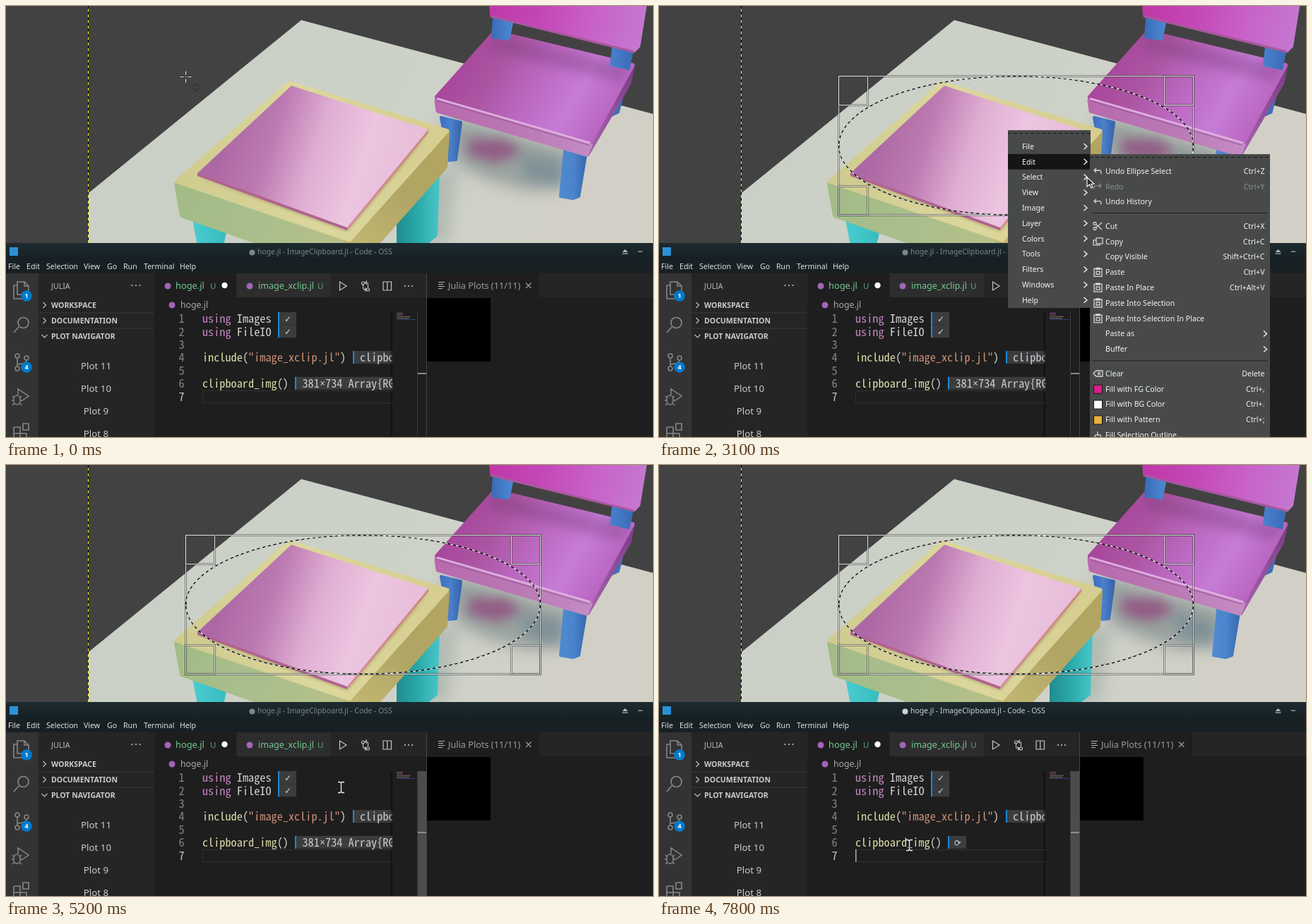
Animation, 916 px wide and 611 px high, one loop 8000 ms. Source, as an HTML page with a canvas:

```html
<!DOCTYPE html>
<html lang="en">
<head>
<meta charset="utf-8">
<title>Copy a selection into the editor</title>
<style>
html, body { margin: 0; width: 100%; height: 100%; overflow: hidden; background: #1e1e1e; }
canvas { display: block; width: 916px; height: 611px; }
</style>
</head>
<body>
<canvas id="stage" width="916" height="611"></canvas>
<script>
const W = 916, H = 611, TOP = 336, LOOP = 8000;
const view = document.getElementById('stage').getContext('2d');
const backdrop = document.createElement('canvas');
backdrop.width = W;
backdrop.height = H;
let ctx = backdrop.getContext('2d');

const SANS = '"Noto Sans", sans-serif';
const MONO = '"Noto Sans Mono CJK JP", "Noto Sans Mono", monospace';
const SYMBOL = '"DejaVu Sans", sans-serif';
const ADVANCE = 8.13;
ctx.font = '100px ' + MONO;
const monoSize = 100 * ADVANCE / ctx.measureText('0').width;
const row = n => 443.3 + (n - 1) * 18.4;

// ---- drawing helpers ----
function box(x, y, w, h, color) {
  ctx.fillStyle = color;
  ctx.fillRect(x, y, w, h);
}
function text(s, x, mid, color, size = 10.6, align = 'left', weight = '', family = SANS) {
  ctx.font = `${weight} ${size}px ${family}`;
  ctx.textAlign = align;
  ctx.fillStyle = color;
  ctx.fillText(s, x, mid + size * 0.36);
}
const mono = (s, x, n, color, align) => text(s, x, row(n), color, monoSize, align, '', MONO);
const code = (s, col, n, color) => mono(s, 278 + col * ADVANCE, n, color);
function disc(x, y, r, color) {
  ctx.fillStyle = color;
  ctx.beginPath();
  ctx.arc(x, y, r, 0, 7);
  ctx.fill();
}
function line(path, color, width = 1) {
  ctx.strokeStyle = color;
  ctx.lineWidth = width;
  ctx.stroke(new Path2D(path));
}
// Filled polygon; a stroke in the same paint rounds the corners.
function poly(path, paint, round = 0) {
  const p = new Path2D('M' + path + 'Z');
  ctx.fillStyle = ctx.strokeStyle = paint;
  ctx.fill(p);
  if (round) {
    ctx.lineJoin = 'round';
    ctx.lineWidth = round;
    ctx.stroke(p);
    ctx.lineJoin = 'miter';
  }
}
function fade(x0, y0, x1, y1, ...colors) {
  const g = ctx.createLinearGradient(x0, y0, x1, y1);
  colors.forEach((c, i) => g.addColorStop(i / (colors.length - 1), c));
  return g;
}
function blurred(path, color, radius) {
  ctx.filter = `blur(${radius}px)`;
  poly(path, color);
  ctx.filter = 'none';
}
function clipTo(x, y, w, h, paint) {
  ctx.save();
  ctx.beginPath();
  ctx.rect(x, y, w, h);
  ctx.clip();
  paint();
  ctx.restore();
}

// ---- rendered furniture ----
function drawScene() {
  const floor = '117,265 418,20 916,153 916,337 117,337';
  poly(floor, fade(250, 90, 800, 330, '#cbd0c6', '#cdd2c9', '#d2d0c6'));
  ctx.save();
  ctx.clip(new Path2D('M' + floor + 'Z'));
  blurred('615,165 650,160 800,205 795,255 740,262 680,245 640,225', 'rgba(115,130,132,.6)', 11);
  blurred('655,188 710,190 730,208 695,222 655,212', 'rgba(145,70,125,.75)', 8);
  blurred('725,210 790,222 785,258 740,245', 'rgba(100,130,145,.5)', 9);
  blurred('590,240 640,225 625,337 580,337', 'rgba(150,165,160,.5)', 10);
  ctx.restore();

  // chair
  poly('616,158 644,165 637,218 627,219', fade(614, 0, 645, 0, '#3c6cc0', '#4a80cc', '#3563a8'), 4);
  poly('858,125 876,115 867,151 856,156', '#3f6fb8', 3);
  poly('791,205 821,210 811,270 803,273 785,270', fade(785, 0, 822, 0, '#4f8ad0', '#4a84cc', '#3868b0'), 4);
  poly('888,86 883,110 824,211 831,195', fade(885, 90, 825, 210, '#7c3f86', '#a863b0'), 4);
  poly('609,134 828,197 822,211 611,149', fade(608, 0, 830, 0, '#b869ae', '#b978b4', '#c48cc4'), 5);
  poly('692,37 887,84 828,192 610,129',
    fade(650, 50, 850, 170, '#a8459c', '#ab55a2', '#bb68c0', '#c67cd6', '#b864c0'), 6);
  blurred('692,40 885,86 868,108 684,62', 'rgba(120,60,120,.35)', 7);
  line('M610 131L827 194', '#e0b0e0', 2.5);
  line('M611 134.5L826 197.5', '#95559a', 1);
  poly('690,17 717,24 712,48 688,45', fade(688, 0, 718, 0, '#3a6cb8', '#4c8ad4'), 2);
  poly('859,58 887,65 882,90 856,84', fade(856, 0, 886, 0, '#4a80cc', '#3a6cb8'), 2);
  poly('686,-5 687,13 889,64 896,57 906,-5', fade(690, 0, 900, 50, '#c038a8', '#c448b8', '#c862c8', '#c478d0'), 4);
  line('M686 14.5L889 65', '#a8589f', 3);

  // table
  poly('265,300 312,315 307,337 272,337', fade(265, 0, 312, 0, '#48ccd0', '#38bcc0'), 3);
  poly('555,300 612,238 609,325 598,334 555,337', fade(553, 0, 612, 0, '#1f8c8e', '#2aa8aa', '#46c4c6'), 4);
  poly('241,252 480,335 492,345 385,345 249,297', fade(240, 260, 480, 337, '#a2bc86', '#a9be8c', '#b8c088'), 6);
  poly('625,180 622,228 518,345 470,345 482,333', fade(620, 190, 500, 337, '#b3a561', '#b0a564', '#c0b570'), 6);
  poly('241,249 401,109 625,177 486,332', fade(240, 250, 620, 180, '#cfca8e', '#dcd79c', '#d6cd90'), 5);
  blurred('271,242 483,319 598,182 480,308', 'rgba(110,90,60,.45)', 2);
  poly('271,236 483,313 483,318 271,241', '#b0648e');
  poly('483,313 598,174 598,180 483,318', fade(483, 316, 598, 178, '#d8879c', '#c98c78'));
  poly('404,113 598,175 483,314 271,237',
    fade(310, 180, 560, 260, '#ac68a4', '#bc7ab2', '#e0aed2', '#ecc5e0', '#e8bedb'));
}
function drawImageWindow() {
  box(0, 0, W, TOP, '#424242');
  clipTo(117, 0, W - 117, TOP, drawScene);
  box(116, 0, 1, TOP, '#000');
  ctx.setLineDash([4, 4]);
  ctx.lineDashOffset = 4;
  line(`M116.5 0V${TOP}`, '#f4ee10');
  ctx.setLineDash([]);
}

// ---- editor window ----
function badge(x, n, width) {
  const y = row(n);
  box(x, y - 9.5, width, 18, '#3a3c3e');
  box(x, y - 9.5, 2, 18, '#1f88d2');
}
function activityIcons() {
  const grey = '#868686', blue = '#007acc';
  line('M16 391H26L32 397V409H16ZM26 391V397H32M16 396H11V415H25V409', grey, 1.6);
  line('M18 455L11 463M17 449A7.5 7.5 0 1 1 32 449A7.5 7.5 0 1 1 17 449', grey, 1.7);
  line('M13 496A3 3 0 1 1 19 496A3 3 0 1 1 13 496M16 499V511M13 514A3 3 0 1 1 19 514A3 3 0 1 1 13 514M26 499A3 3 0 1 1 32 499A3 3 0 1 1 26 499M29 502Q29 507 16 508', grey, 1.6);
  line('M17 551V543L32 553L22 560M11 557A4.5 5 0 0 1 20 557V560A4.5 5 0 0 1 11 560ZM9 553L12 556M22 553L19 556M8 559H11M20 559H23M9 566L12 563M22 566L19 563', grey, 1.5);
  line('M11 597H20V615M11 606H29V615M11 597V615M24 592H32V601H24Z', grey, 1.6);
  [[411, '1'], [512, '4']].forEach(([y, n]) => {
    disc(29, y, 7.8, blue);
    text(n, 29, y, '#fff', 9, 'center', 'bold');
  });
}
function drawEditor() {
  box(0, TOP, W, 379 - TOP, '#182023');
  box(0, TOP, W, 24, fade(0, TOP, 0, 360, '#1d2a2f', '#162024'));
  box(5, 342, 12, 12, '#2b91d4');
  [['File', 3], ['Edit', 29], ['Selection', 57], ['View', 110], ['Go', 143], ['Run', 166],
    ['Terminal', 195], ['Help', 246]].forEach(([s, x]) => text(s, x, 369.5, '#dfe3e3'));
  poly('872.5,349 876.5,345 880.5,349', '#b4bcbc');
  box(872.5, 350.5, 8, 1.2, '#b4bcbc');
  box(895, 347.5, 6, 1.2, '#b4bcbc');

  box(0, 379, 46, 232, '#333333');
  box(46, 379, 164, 232, '#252526');
  box(210, 379, 706, 232, '#1e1e1e');
  box(210, 379, 706, 34, '#252526');
  box(211, 379, 115, 34, '#1e1e1e');
  box(327, 379, 133, 34, '#2d2d2d');
  box(596, 379, 159, 34, '#1e1e1e');
  activityIcons();

  text('JULIA', 64, 397, '#bbbbbb');
  [178.5, 184, 189.5].forEach(x => disc(x, 396, 1.1, '#c5c5c5'));
  ['WORKSPACE', 'DOCUMENTATION', 'PLOT NAVIGATOR'].forEach((s, i) => {
    const y = 424 + i * 22;
    if (i) box(46, y - 11.5, 164, 1, '#3b3b3c');
    line(i < 2 ? `M52.5 ${y - 4}l4 4l-4 4` : `M50.5 ${y - 2}l4 4l4 -4`, '#c5c5c5', 1.1);
    text(s, 64, y, '#cccccc', 10.5, 'left', 'bold');
  });
  [11, 10, 9, 8].forEach((n, i) => text('Plot ' + n, 127.5, 510 + i * 32, '#cccccc', 13.3, 'center'));

  const green = '#73c991', purple = '#a265b8';
  disc(229, 397, 4.5, purple);
  text('hoge.jl', 240, 396.5, green, 12.8);
  text('U', 289, 396.5, '#5ba377', 11.5);
  disc(309.5, 396, 4.2, '#ffffff');
  disc(345, 397, 4.5, purple);
  text('image_xclip.jl', 357, 396.5, green, 12.6);
  text('U', 441, 396.5, '#5ba377', 11.5);
  line('M472.5 391V403L482 397Z', '#c5c5c5', 1.2);
  line('M503.5 393a2 2 0 1 1 4 0a2 2 0 1 1 -4 0M505.5 395V400Q505.5 402 510 402M508 399.5l2.5 2.5l-2.5 2.5M510.5 402a2 2 0 1 1 4 0a2 2 0 1 1 -4 0M512.5 400V394Q512.5 392 508.5 392M511 389.5l-2.5 2.5l2.5 2.5', '#c5c5c5', 1.1);
  line('M534 391H545.5V403H534ZM539.8 391V403', '#c5c5c5', 1.2);
  [565, 570, 575].forEach(x => disc(x, 397, 1.1, '#c5c5c5'));
  disc(235, 424, 4.5, purple);
  text('hoge.jl', 247, 424, '#a9a9a9', 12.3);

  line('M612 391.5H621M612 394.5H619M612 397.5H621M612 400.5H618', '#b5b5b5', 1);
  text('Julia Plots (11/11)', 626, 396.5, '#9b9b9b', 12.7);
  line('M736 392.5l7.5 7.5m0 -7.5l-7.5 7.5', '#a0a0a0', 1.1);
  box(596, 414, 90, 90, '#000');

  clipTo(210, 414, 337, 197, () => {
    ['Images', 'FileIO'].forEach((name, i) => {
      code('using', 0, i + 1, '#c586c0');
      code(name, 6, i + 1, '#d4d4d4');
      badge(385, i + 1, 26);
      text('✓', 399, row(i + 1), '#d8d8d8', 12, 'center', '', SYMBOL);
    });
    code('include', 0, 4, '#dcdcaa');
    code('(', 7, 4, '#d4d4d4');
    code('"image_xclip.jl"', 8, 4, '#ce9178');
    code(')', 24, 4, '#d4d4d4');
    badge(491, 4, 120);
    mono('clipboard_img', 501, 4, '#cccccc');
  });

  box(543, 434, 4, 177, fade(543, 0, 547, 0, 'rgba(0,0,0,0)', 'rgba(0,0,0,.5)'));
  [['#805a80', 9], ['#805a80', 9], ['#80685a', 20], ['#787860', 18]].forEach(([c, w], i) =>
    box(553, 435 + i * 2.4, w, 1, c));
  box(553, 444, 28, 1, '#323c78');
  box(582, 434, 1, 177, '#3c3c3c');
  box(595, 379, 1, 232, '#444444');
}

function drawEditorState(t, pointer) {
  const title = t >= 5900 ? '#ccd3d3' : '#7d8687';
  disc(348.5, 349.5, 4, title);
  text('hoge.jl - ImageClipboard.jl - Code - OSS', 356, 348, title, 10.4);

  const ran = t >= 7200, active = t >= 5800 && !ran ? 6 : 7;
  for (let n = 1; n <= 7; n++) mono(n, 252.5, n, n === active ? '#c6c6c6' : '#858585', 'right');
  const word = t >= 5900 && !ran;
  clipTo(210, 414, 337, 197, () => {
    if (word) box(278, row(6) - 9, 13 * ADVANCE, 18.4, '#474747');
    else {
      ctx.strokeStyle = '#303030';
      ctx.lineWidth = 1;
      ctx.strokeRect(278.5, Math.round(row(active)) - 8.5, 300, 17);
    }
    code('clipboard_img', 0, 6, '#dcdcaa');
    code('()', 13, 6, '#d4d4d4');
    badge(409, 6, ran ? 26 : 200);
    if (ran) {
      text('⟳', 423, row(6), '#d8d8d8', 12, 'center', '', SYMBOL);
      box(278, row(7) - 9, 1.5, 18, '#aeafad');
    } else {
      // The sign is full width in the code font, so it comes from another face.
      mono('381', 419.5, 6, '#cccccc');
      text('×', 419.5 + 3.5 * ADVANCE, row(6), '#cccccc', 13.5, 'center', '', '"Noto Sans Mono", monospace');
      mono('734 Array{RGB{N0f8}', 419.5 + 4 * ADVANCE, 6, '#cccccc');
    }
  });

  if (pointer.x < 595 && pointer.y > 435) box(583, 434, 12, 177, '#4c4c4c');
  if (word) {
    box(583, 507, 12, 3, '#9a9a9a');
    box(587, 510, 4, 12, '#9a9a9a');
  } else box(583, 520, 12, 2, '#8d8d8d');
}

// ---- ellipse selection ----
function outline(path) {
  line(path, 'rgba(60,60,60,.55)', 3);
  line(path, 'rgba(255,255,255,.8)', 1);
}
const rect = (x, y, w, h) => `M${x} ${y}h${w}v${h}h${-w}Z`;
function drawSelection(t, corner) {
  const x = 254.5, y = 99.5, w = Math.round(corner.x - 254), h = Math.round(corner.y - 100);
  if (w < 2 || h < 2) return;
  const oval = `M${x} ${y + h / 2}a${w / 2} ${h / 2} 0 1 1 ${w} 0a${w / 2} ${h / 2} 0 1 1 ${-w} 0`;
  const hw = Math.min(41, w / 3), hh = Math.min(41, h / 3);
  outline(rect(x, y, w, h));
  if (t < 1100) {
    outline(rect(x + w - hw, y + h - hh, hw, hh));
    outline(oval);
    return;
  }
  for (const hx of [x, x + w - hw])
    for (const hy of [y, y + h - hh]) outline(rect(hx, hy, hw, hh));
  line(oval, '#000', 1.2);
  ctx.setLineDash([4, 4]);
  ctx.lineDashOffset = -t / 100 % 8;
  line(oval, '#fff', 1.2);
  ctx.setLineDash([]);
}

// ---- menus ----
const MAIN = ['File', 'Edit', 'Select', 'View', 'Image', 'Layer', 'Colors', 'Tools', 'Filters', 'Windows', 'Help'];
const arrow = '>';
const EDIT = [
  [234, ['Undo Ellipse Select', 'Ctrl+Z', 'undo'], ['Redo', 'Ctrl+Y', 'redo'], ['Undo History', '', 'undo']],
  [312, ['Cut', 'Ctrl+X', 'cut'], ['Copy', 'Ctrl+C', 'copy'], ['Copy Visible', 'Shift+Ctrl+C'],
    ['Paste', 'Ctrl+V', 'paste'], ['Paste In Place', 'Ctrl+Alt+V', 'paste'], ['Paste Into Selection', '', 'paste'],
    ['Paste Into Selection In Place', '', 'paste'], ['Paste as', arrow], ['Buffer', arrow]],
  [521, ['Clear', 'Delete', 'clear'], ['Fill with FG Color', 'Ctrl+,', '#d81e8c'],
    ['Fill with BG Color', 'Ctrl+.', '#ffffff'], ['Fill with Pattern', 'Ctrl+;', '#e8b23c'],
    ['Fill Selection Outline...', '', 'bucket']]
];
const ICONS = {
  undo: 'M4 -4L1 -1L4 2M1 -1H9Q11 -1 11 4',
  redo: 'M8 -4L11 -1L8 2M11 -1H3Q1 -1 1 4',
  cut: 'M12 -5L4 2M12 5L4 -2M0 3.5a2 2 0 1 1 4 0a2 2 0 1 1 -4 0M0 -3.5a2 2 0 1 1 4 0a2 2 0 1 1 -4 0',
  copy: 'M4 -5H13V3H4ZM4 -2H0V5H9V3',
  paste: 'M1 -5H12V6H1ZM4 -6H9V-4H4ZM4 -1H9V3H4Z',
  clear: 'M0 0L4 -4H13V4H4ZM6 -2L10 2M10 -2L6 2',
  bucket: 'M6 -5V1M3 0H10L11 5H1Z'
};
function panel(x, y, w, h) {
  box(x, y, w, h, '#474a49');
  ctx.setLineDash([5, 3]);
  ctx.lineDashOffset = 0;
  line(`M${x} ${y + 4.5}h${w}`, '#171918');
  ctx.setLineDash([]);
}
const chevron = (x, y) => line(`M${x} ${y - 4}l4.5 4l-4.5 4`, '#f0f0f0', 1.4);

function drawMenus(t, pointer) {
  const open = t >= 3100;
  panel(494, 176, 117, 252);
  MAIN.forEach((label, i) => {
    const y = 199 + i * 21.8;
    const hot = open ? i === 1 : pointer.x > 496 && Math.abs(pointer.y - y) < 10.9;
    if (hot) box(494, y - 11, 117, 21.8, '#141515');
    text(label, 514, y, '#f4f4f4');
    chevron(601.5, y);
  });
  if (!open) return;
  panel(610, 210, 255, 401);
  box(614, 293, 247, 1, '#1d1f1e');
  box(614, 502.5, 247, 1, '#1d1f1e');
  for (const [top, ...items] of EDIT) items.forEach(([label, key, icon], i) => {
    const y = top + i * 21.8, off = label === 'Redo', color = off ? '#8d908f' : '#f4f4f4';
    if (pointer.x > 612 && Math.abs(pointer.y - y) < 10.9) box(610, y - 11, 255, 21.8, '#141515');
    text(label, 632, y, color);
    if (key === arrow) chevron(856, y);
    else text(key, 857.5, y, color, 10.6, 'right');
    if (!icon) return;
    if (icon[0] === '#') {
      box(615, y - 6, 13, 13, '#1a1a1a');
      box(616, y - 5, 11, 11, icon);
      return;
    }
    ctx.save();
    ctx.translate(615, y);
    line(ICONS[icon], off ? '#8d908f' : '#d6d6d6', 1.3);
    ctx.restore();
  });
}

// ---- pointer ----
const PATH = [[0, 254, 100], [300, 254, 100], [900, 746, 290], [1100, 756, 297], [1650, 494, 176],
  [2000, 494, 176], [2400, 556, 222], [3000, 556, 222], [3100, 606, 243], [3650, 643, 334],
  [4100, 643, 334], [4200, 643, 326], [4600, 632, 350], [5700, 354, 539], [LOOP, 354, 539]];
function pointerAt(t) {
  const i = Math.max(1, PATH.findIndex(p => p[0] >= t));
  const [t0, x0, y0] = PATH[i - 1], [t1, x1, y1] = PATH[i];
  const u = Math.max(0, (t - t0) / (t1 - t0)), e = u * u * (3 - 2 * u);
  return { x: x0 + (x1 - x0) * e, y: y0 + (y1 - y0) * e };
}
function drawPointer(t, { x, y }) {
  const menu = t >= 1800 && t < 4100;
  ctx.save();
  ctx.translate(Math.round(x), Math.round(y));
  if (!menu && y > 435 && x < 547) {
    const beam = 'M-4 -7.5H-1L0.5 -6L2 -7.5H5M0.5 -6V6M-4 7.5H-1L0.5 6L2 7.5H5';
    line(beam, '#222', 3);
    line(beam, '#f0f0f0', 1.3);
  } else if (menu || y > TOP) {
    const shape = '0,0 0,13 3.5,10 6,15 8,14 6,9.5 10,9';
    poly(shape, '#2a2c2c');
    line('M' + shape + 'Z', '#f5f5f5', 1.2);
  } else {
    const cross = 'M-7.5 .5H-2.5M3.5 .5H8.5M.5 -7.5V-2.5M.5 3.5V8.5M0 .5H1';
    line(cross, '#222', 2.6);
    line(cross, '#fff', 1.2);
    const ring = 'M11.5 15.5a4 4 0 1 1 8 0a4 4 0 1 1 -8 0';
    const dragging = t >= 300 && t < 1100;
    line(ring, '#1c1c1c', dragging ? 3 : 1.8);
    if (!dragging) ctx.setLineDash([1.5, 2]);
    line(ring, dragging ? '#ddd' : '#999', 1);
    ctx.setLineDash([]);
  }
  ctx.restore();
}

drawImageWindow();
drawEditor();
ctx = view;

const DRAG_LAG = 50;
function draw(now) {
  const t = Math.floor(now % LOOP / 100) * 100;
  const pointer = pointerAt(t);
  ctx.drawImage(backdrop, 0, 0);
  drawEditorState(t, pointer);
  drawSelection(t, t < 1100 ? pointerAt(Math.max(0, t - DRAG_LAG)) : { x: 756, y: 297 });
  if (t >= 1800 && t < 4100) drawMenus(t, pointer);
  drawPointer(t, pointer);
}
const start = performance.now();
function tick() {
  draw(performance.now() - start);
  requestAnimationFrame(tick);
}
tick();
</script>
</body>
</html>
```
